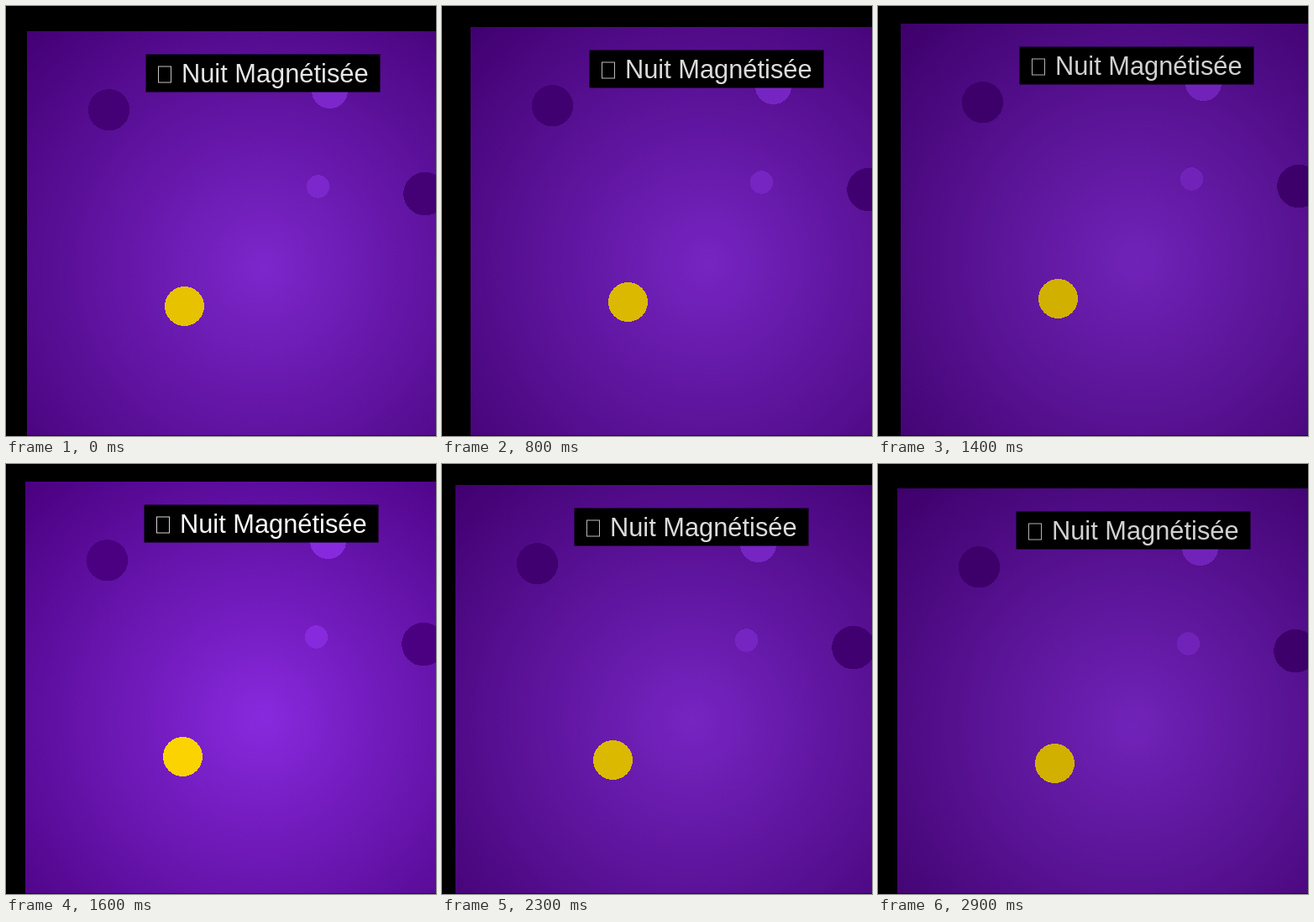
An HTML page for the animation above (3 s loop, 512 px wide and 512 px high).

```html
<!DOCTYPE html>
<html lang="fr">
<head>
<meta charset="utf-8">
<title>Nuit Magnétisée</title>
<style>
  html, body { margin: 0; width: 100%; height: 100%; overflow: hidden; background: #000; }
  svg { display: block; width: 512px; height: 512px; }
  circle { shape-rendering: crispEdges; }
  .dark { fill: indigo; }
  .light { fill: blueviolet; }
  .sun { fill: gold; }
  text { font: 30.8px "Liberation Sans", Arial, sans-serif; fill: #fff; }
</style>
</head>
<body>
<svg viewBox="0 0 512 512">
  <defs>
    <radialGradient id="glow" gradientUnits="userSpaceOnUse" cx="281.5" cy="281.5" r="398">
      <stop offset="0" stop-color="blueviolet"/>
      <stop offset="1" stop-color="indigo"/>
    </radialGradient>
  </defs>
  <g id="scene">
    <rect width="563" height="563" fill="url(#glow)"/>
    <circle class="dark" cx="97.5" cy="93.7" r="24.7"/>
    <circle class="dark" cx="474" cy="193.6" r="25.8"/>
    <circle class="light" cx="360.5" cy="70.5" r="21.6"/>
    <circle class="light" cx="346.5" cy="185" r="13.7"/>
    <circle class="sun" cx="187.5" cy="327.5" r="23.5"/>
    <rect x="141.5" y="27.5" width="279" height="45"/>
    <rect x="156.5" y="42" width="15" height="19" fill="none" stroke="#fff" stroke-opacity=".85"/>
    <text x="184" y="61">Nuit Magnétisée</text>
  </g>
  <rect y="511" width="512" height="1" opacity=".5"/>
</svg>
<script>
  const LOOP = 3000, STEP = 100;
  const scene = document.getElementById('scene');
  const start = performance.now();

  function draw(now) {
    const t = Math.floor(Math.max(0, now - start) % LOOP / STEP) * STEP;
    const a = 2 * Math.PI * t / LOOP;
    // whole-pixel sway; the epsilon keeps exact peaks from rounding down
    const sway = v => 25 + Math.trunc(v + Math.sign(v) * 1e-9);
    const x = sway(10 * Math.sin(a)), y = sway(5 * Math.cos(a));
    scene.setAttribute('transform', `translate(${x} ${y})`);
    scene.style.filter = `brightness(${0.9 + 0.2 * Math.sin(2 * a)})`;
    requestAnimationFrame(draw);
  }
  draw(start);
</script>
</body>
</html>
```
